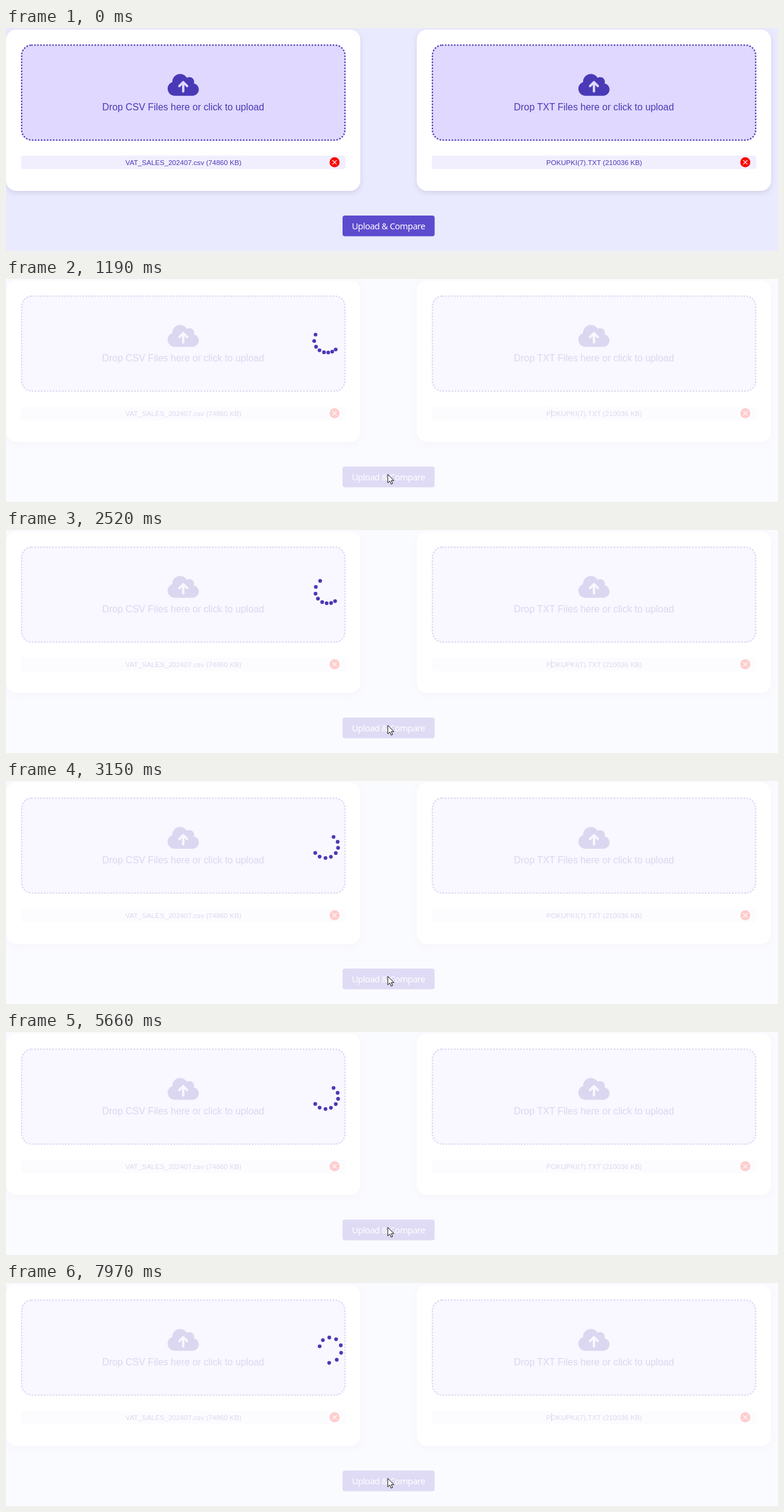
An HTML page for the animation above (8000 ms loop, 1280 by 371 pixels).

```html
<!DOCTYPE html>
<html lang="en">
<head>
<meta charset="utf-8">
<title>Upload and compare</title>
<style>
  html, body { margin: 0; width: 100%; height: 100%; overflow: hidden; background: #e9eafd; }
  svg { display: block; }
  text { font-family: "Liberation Sans", Arial, sans-serif; fill: #4a39b6; text-anchor: middle; }
  .card { fill: #fff; filter: drop-shadow(0 3px 4px rgba(30, 30, 90, .12)); }
  .zone { fill: #e0d8ff; }
  .dots { fill: none; stroke: #4a39b6; stroke-width: 2.6; stroke-linecap: round; stroke-dasharray: 0 5; }
  .hint { font-size: 15.85px; }
  .file { font-size: 11.6px; }
  .label { font: 14.4px "Noto Sans", "Open Sans", sans-serif; letter-spacing: -.45px; fill: #fff; }
  .cursor path { fill: #fff; stroke: #111; stroke-width: 1; stroke-linejoin: round; }
</style>
</head>
<body>
<svg id="stage" width="1280" height="371" viewBox="0 0 1280 371"></svg>
<script>
const LOOP = 8000;
const ENTER = 490, ARRIVE = 910, CLICK = 1050, LOAD = 1190;
const STEP = 69.76;                 // screen refresh interval
const TURN = 18;                    // refreshes per spinner turn
const CENTER = [535.5, 106.5];
// radius and resting angle of each spinner dot
const DOTS = [[15.5, 42.3], [15.3, 65.2], [15.8, 87], [17.5, 106], [19.8, 124.6],
              [22.3, 138.6], [24.8, 153.6], [26.3, 167.6]];

const CLOUD = 'M144 480C64.5 480 0 415.5 0 336c0-62.8 40.2-116.2 96.2-135.9c-.1-2.7-.2-5.4-.2-8.1' +
  'c0-88.4 71.6-160 160-160c59.3 0 111 32.2 138.7 80.2C409.9 102 428.3 96 448 96c53 0 96 43 96 96' +
  'c0 12.2-2.3 23.8-6.4 34.6C596 238.4 640 290.1 640 352c0 70.7-57.3 128-128 128H144zm79-217' +
  'c-9.4 9.4-9.4 24.6 0 33.9s24.6 9.4 33.9 0l39-39V392c0 13.3 10.7 24 24 24s24-10.7 24-24V257.9' +
  'l39 39c9.4 9.4 24.6 9.4 33.9 0s9.4-24.6 0-33.9l-80-80c-9.4-9.4-24.6-9.4-33.9 0l-80 80z';

const card = (x, type, file) => `
  <g transform="translate(${x} 0)">
    <rect class="card" x="0" y="2.5" width="587.5" height="268.5" rx="17"/>
    <rect class="zone" x="25" y="27.5" width="538" height="160" rx="18"/>
    <rect class="dots" x="26" y="28.5" width="536" height="158" rx="17"/>
    <path d="${CLOUD}" fill="#4a39b6" transform="translate(268 73.9) scale(.0808)"/>
    <text class="hint" x="293.8" y="137">Drop ${type} Files here or click to upload</text>
    <rect x="25" y="212.3" width="538" height="22.5" rx="4" fill="#f1effe"/>
    <text class="file" x="294.2" y="227.7">${file}</text>
    <circle cx="544.8" cy="223.4" r="8.3" fill="#f00"/>
    <path d="M541.4 220l6.8 6.8m0-6.8l-6.8 6.8" stroke="#fff" stroke-width="1.1"/>
  </g>`;

const $ = id => document.getElementById(id);
const show = (id, on) => $(id).setAttribute('visibility', on ? 'visible' : 'hidden');

$('stage').innerHTML = `
  <rect width="1280" height="371" fill="#e9eafd"/>
  ${card(0, 'CSV', 'VAT_SALES_202407.csv (74860 KB)')}
  ${card(681, 'TXT', 'POKUPKI(7).TXT (210036 KB)')}
  <rect id="caret" x="904" y="217" width="1" height="13" fill="#2a2080"/>
  <rect id="button" x="558" y="312" width="152.7" height="34.5" rx="4"/>
  <text class="label" x="634.2" y="335">Upload &amp; Compare</text>
  <rect id="veil" width="1280" height="371" fill="#fff" fill-opacity=".8"/>
  <g id="spinner" fill="#4a39b6">${DOTS.map(() => '<circle r="3.1"/>').join('')}</g>
  <g id="pointer" class="cursor">
    <circle id="press" r="10" fill="#ff0" fill-opacity=".5"/>
    <path id="arrow" d="M0 0V14.2L3.4 11.1 5.6 16.3 8 15.2 5.8 10.3H10.2Z"/>
    <path id="hand" d="M-1.5 2.6a1.6 1.6 0 0 1 3.2 0V7.6L7.3 9.2q1.4.6 1.4 2.4V14L7.3 18.5H.6L-1 15.6-5 11q-.8-1.6.6-2 1.3-.2 2.9 1.9Z"/>
  </g>`;

// cubic-bezier(.5, 0, .5, 1)
function ease(x) {
  let lo = 0, hi = 1;
  for (let i = 0; i < 24; i++) {
    const m = (lo + hi) / 2;
    if (1.5 * m - 1.5 * m * m + m ** 3 < x) lo = m; else hi = m;
  }
  return lo * lo * (3 - 2 * lo);
}

function spin(t) {
  const phase = .028 + Math.floor((t - LOAD) / STEP) / TURN;
  [...$('spinner').children].forEach((dot, i) => {
    const [r, rest] = DOTS[i];
    const a = (rest + 360 * ease((phase + .03 * (i + 1)) % 1)) * Math.PI / 180;
    dot.setAttribute('cx', CENTER[0] + r * Math.cos(a));
    dot.setAttribute('cy', CENTER[1] + r * Math.sin(a));
  });
}

// The caret blinks for a while, then stays lit.
function caretOn(t) {
  if (t < CLICK) return false;
  return t < 1830 || t >= 6825 || Math.floor((t - 1830) / 555) % 2 === 1;
}

function draw(t) {
  const loading = t >= LOAD;
  const move = Math.min(1, Math.max(0, Math.floor((t - ENTER) / 70 + 1) * 70 / (ARRIVE - ENTER)));
  const left = (1 - move) ** 2;
  const x = 633 + 12 * left, y = 325 + 55 * left;
  const hover = !loading && t >= ENTER && y < 346;

  show('veil', loading);
  show('spinner', loading);
  show('caret', caretOn(t));
  show('press', t >= CLICK && !loading);
  show('hand', hover);
  show('arrow', t >= ENTER && !hover);
  $('button').setAttribute('fill', hover ? '#4a39b6' : '#5d4bce');
  $('pointer').setAttribute('transform', `translate(${x} ${y})`);
  if (loading) spin(t);
}

const start = performance.now();
function tick() {
  draw((performance.now() - start) % LOOP);
  requestAnimationFrame(tick);
}
tick();
</script>
</body>
</html>
```
